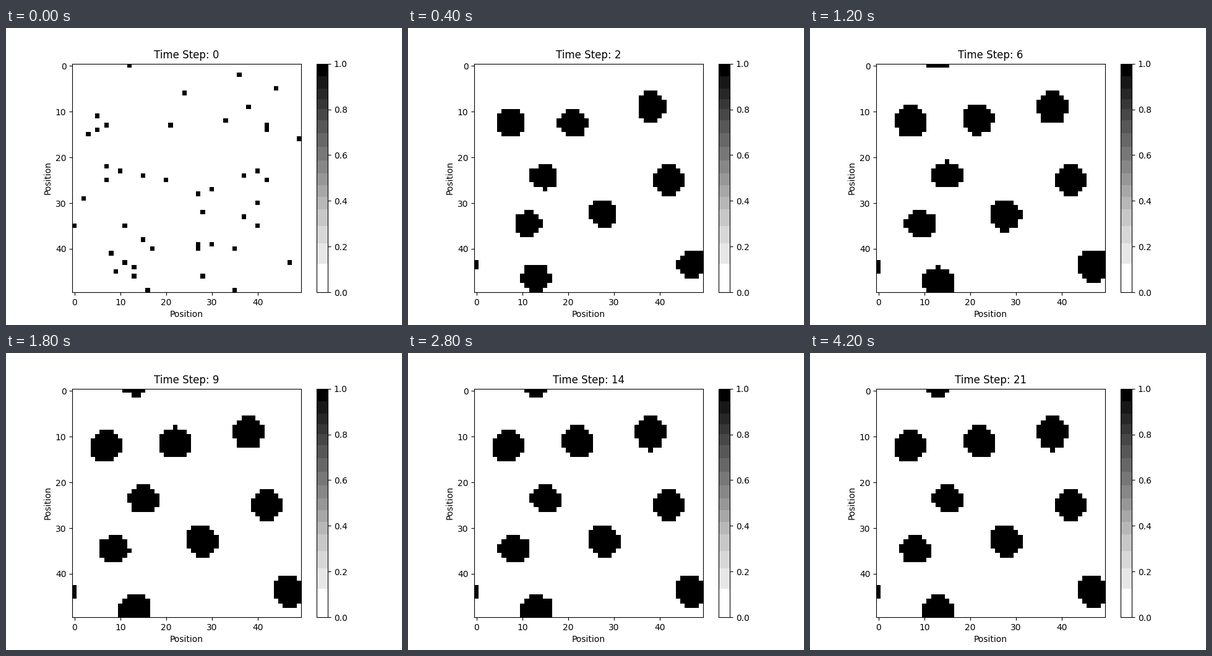
These frames come from a looping animation (640x480 px, 4400 ms). A matplotlib script:

```python
import math

import numpy as np
import matplotlib.pyplot as plt
from matplotlib.animation import FuncAnimation
from matplotlib.colors import ListedColormap

N = 50
STEPS = 22
STRAY_SEEDS = 37
RADIUS = 3.45

rows, cols = np.mgrid[:N, :N]


class Spot:
    """A round patch that grows from a seed and drifts to its resting place."""

    def __init__(self, start, end, rx=RADIUS, ry=RADIUS):
        self.start, self.end = np.array(start), np.array(end)
        self.rx, self.ry = rx, ry

    def mask(self, step):
        grown = 1 - 0.28 ** step
        drift = 1 - math.exp(-max(step - 2, 0) / 4)
        x, y = self.start + (self.end - self.start) * drift
        dx = wrapped(cols - x) / (self.rx * grown)
        dy = wrapped(rows - y) / (self.ry * grown)
        return dx ** 2 + dy ** 2 <= 1


SPOTS = [
    Spot((7.4, 12.55), (6.8, 12.1)),
    Spot((21.1, 12.6), (22.15, 11.1)),
    Spot((38.3, 9.0), (38.0, 9.3), rx=3.3, ry=3.72),
    Spot((14.7, 24.3), (15.14, 23.55), rx=3.35, ry=2.95),
    Spot((42.0, 25.0), (42.0, 25.0)),
    Spot((27.7, 32.3), (27.8, 32.9)),
    Spot((11.2, 34.6), (8.1, 34.7), rx=3.4, ry=3.05),
    Spot((13.0, 46.45), (13.15, 48.0)),
    Spot((47.1, 43.45), (46.8, 43.9)),
]


def wrapped(distance):
    """Shortest signed distance on a field whose edges are joined."""
    return (distance + N / 2) % N - N / 2


def seed_grid():
    grid = np.zeros((N, N))
    for spot in SPOTS:
        col, row = np.rint(spot.start).astype(int)
        grid[row, col] = 1
    empty = np.flatnonzero(grid == 0)
    rng = np.random.default_rng(7)
    grid.flat[rng.choice(empty, STRAY_SEEDS, replace=False)] = 1
    return grid


def grid_at(step):
    if step == 0:
        return seed_grid()
    return np.any([spot.mask(step) for spot in SPOTS], axis=0).astype(float)


def banded_greys():
    """Greys colormap reduced to sixteen levels."""
    level = plt.get_cmap("Greys")(np.linspace(0, 1, 256))[:, 0] * 255 // 16
    grey = level * 16 + 7
    grey[level == 15] = 255
    grey[level == 0] = 0
    return ListedColormap(np.repeat(grey[:, None] / 255, 3, axis=1))


fig, ax = plt.subplots(figsize=(6.4, 4.8), dpi=100)
image = ax.imshow(grid_at(0), cmap=banded_greys(), vmin=0, vmax=1,
                  interpolation="nearest")
fig.colorbar(image)
ax.set_xlabel("Position")
ax.set_ylabel("Position")
title = ax.set_title("Time Step: 0")


def update(step):
    image.set_data(grid_at(step))
    title.set_text(f"Time Step: {step}")
    return image, title


anim = FuncAnimation(fig, update, frames=STEPS, interval=200, repeat=True)
plt.show()
```
